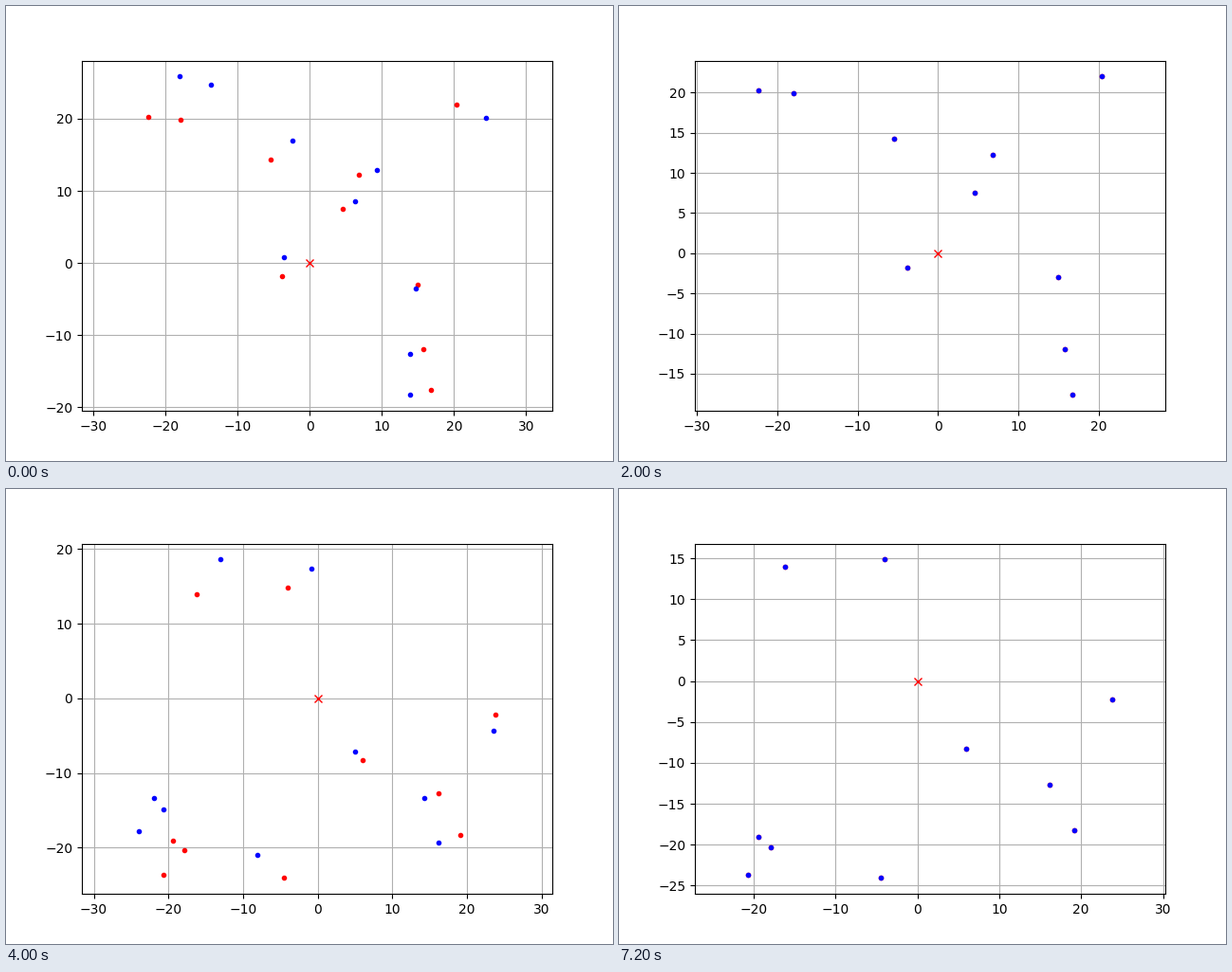
Write a matplotlib script that moves like this. It is 640 px wide and 480 px high and loops after 8000 ms.

```python
import matplotlib.pyplot as plt
import numpy as np
from matplotlib.animation import FuncAnimation

STEP_MS = 1000
STEPS_PER_RUN = 4
TURN, SHIFT = np.radians(-10), np.array([0.5, 2.0])  # sensor motion per run

# Landmarks seen in each of the two runs
SCANS = np.array([
    [(-22.34, 20.28), (-17.95, 19.92), (-5.42, 14.3), (6.82, 12.22),
     (4.58, 7.51), (20.39, 22.01), (-3.8, -1.85), (14.95, -3.0),
     (15.77, -11.99), (16.79, -17.66)],
    [(-16.2, 14.0), (-4.04, 14.85), (23.82, -2.23), (5.97, -8.27),
     (16.17, -12.68), (19.14, -18.26), (-19.42, -19.05), (-17.93, -20.33),
     (-20.71, -23.7), (-4.48, -24.07)],
])


def displace(points):
    c, s = np.cos(TURN), np.sin(TURN)
    return points @ np.array([(c, s), (-s, c)]) + SHIFT


def icp_step(fixed, moving):
    """Pair each point with its nearest landmark, then apply the best rigid fit."""
    gaps = np.linalg.norm(moving[:, None] - fixed[None], axis=2)
    paired = fixed[gaps.argmin(axis=1)]
    mid_m, mid_p = moving.mean(axis=0), paired.mean(axis=0)
    u, _, vt = np.linalg.svd((moving - mid_m).T @ (paired - mid_p))
    return (moving - mid_m) @ u @ vt + mid_p


def match(fixed):
    moving = displace(fixed)
    for _ in range(STEPS_PER_RUN):
        yield fixed, moving
        moving = icp_step(fixed, moving)


steps = [step for scan in SCANS for step in match(scan)]
fig, ax = plt.subplots(figsize=(6.4, 4.8), dpi=100)


def draw(i):
    fixed, moving = steps[i]
    ax.cla()
    ax.plot(*fixed.T, ".r")
    ax.plot(*moving.T, ".b")
    ax.plot(0, 0, "xr")
    ax.grid(True)
    ax.axis("equal")


anim = FuncAnimation(fig, draw, frames=len(steps), interval=STEP_MS,
                     init_func=lambda: draw(0), repeat=True, repeat_delay=0)
plt.show()
```
